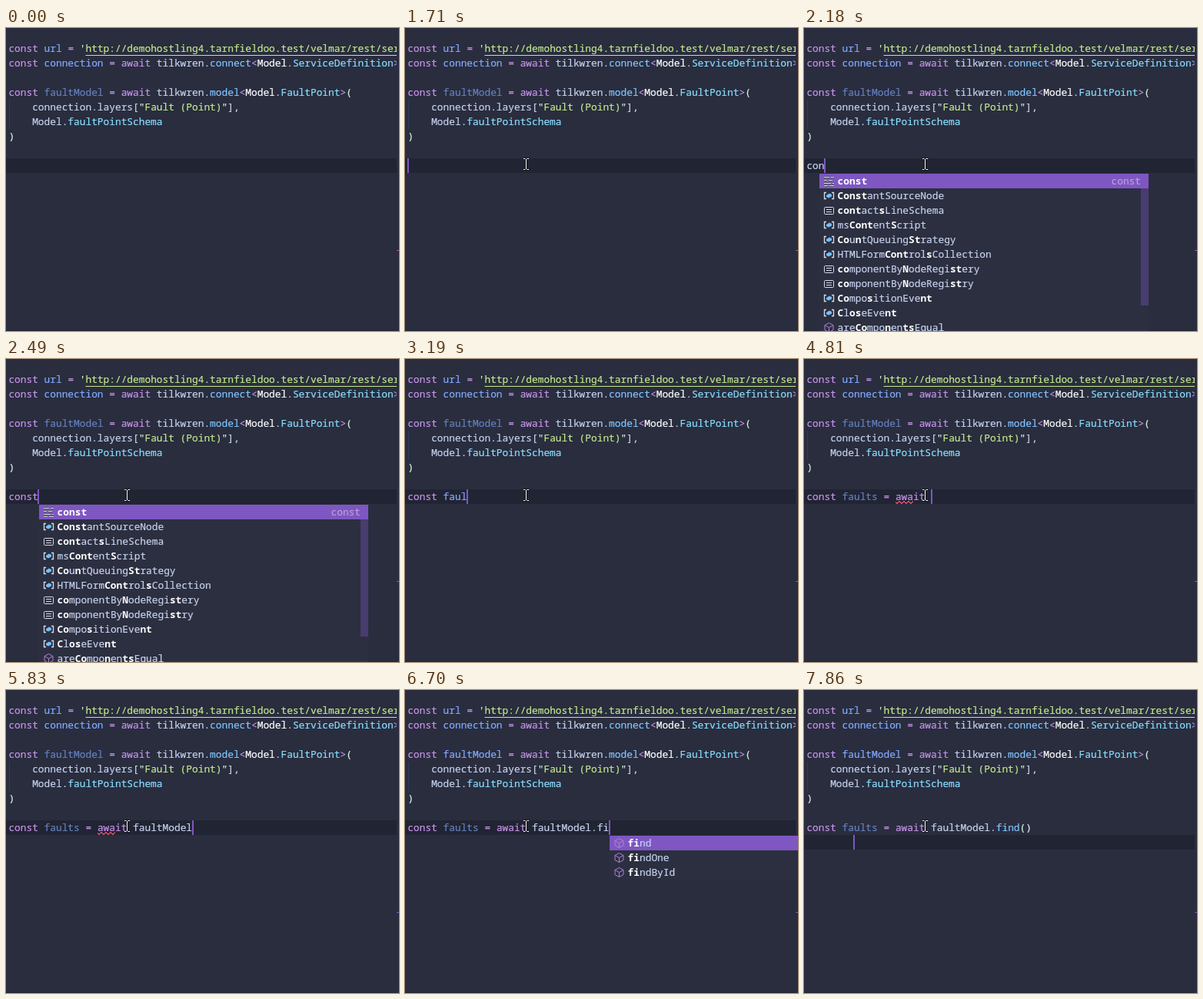
An HTML page for the animation above (8 s loop, 511 by 393 pixels).

```html
<!DOCTYPE html>
<html lang="en">
<head>
<meta charset="utf-8">
<title>Typing a query</title>
<style>
  html, body { margin: 0; width: 100%; height: 100%; overflow: hidden; background: #292d3e; }
  body {
    position: relative; color: #c6d2ee; white-space: pre;
    font: 12.83px/19px "Noto Sans Mono", "DejaVu Sans Mono", monospace;
    -webkit-text-stroke: .2px;
  }
  body > *, .row > * { position: absolute; }
  .line { left: 3.4px; width: 504.6px; height: 19px; overflow: hidden; }
  .k { color: #c792ea; }
  .v { color: #82aaff; }
  .f { color: #82c4ff; }
  .p { color: #89ddff; }
  .s { color: #c3e88d; }
  .q { color: #d9f5dd; }
  .w { color: #fff; }
  .dim { color: #6480be; }
  .link { text-decoration: underline 1px; text-underline-offset: 4px; }
  #active { left: 0; width: 508px; height: 19px; background: #212433; }
  #guide { left: 4px; top: 93px; width: 1px; height: 38px; background: #32395c; }
  #foot { left: 0; top: 392px; width: 508px; height: 1px; background: #212433; }
  #mark { left: 508px; top: 288px; width: 3px; height: 1px; }
  #caret { width: 2px; height: 19px; background: #7e57c2; }
  #wave { top: 184px; height: 4px; overflow: hidden; }
  #popup { top: 189px; width: 428px; overflow: hidden; background: #2c2f40; }
  #thumb { right: 0; top: 0; width: 10px; height: 171px; position: absolute; background: rgba(126, 87, 194, .353); }
  .row { position: relative; height: 19px; }
  .row.on { background: #7e57c2; }
  .row svg { left: 5px; top: 2px; }
  .row span { left: 23.6px; }
  .row b { color: #fff; -webkit-text-stroke: 0; }
  .row em { right: 10px; font-style: normal; color: #b7a0dc; }
  svg { fill: none; stroke: #d5d9e8; }
  #mouse { left: 0; top: 0; }
</style>
</head>
<body><div id="active"></div><div id="guide"></div><div id="foot"></div><div id="mark"></div><svg id="wave" width="40" height="4"><path stroke="#ff5370" stroke-width="1.1"/></svg><div id="popup"></div><div id="caret"></div><svg id="mouse" width="9" height="18"><path stroke="#111" stroke-width="3" opacity=".6" d="M1 1.5h7M1 15.5h7M4.5 1v15"/><path stroke="#fff" d="M1 1.5h2.5M5.5 1.5h2.5M1 15.5h2.5M5.5 15.5h2.5M4.5 2v13"/></svg>
<script>
const LOOP = 8000, CELL = 7.698, LEFT = 3.4, ROW = 19;
const $ = id => document.getElementById(id);
const tag = (cls, s) => `<span class="${cls}">${s}</span>`;
const colX = col => LEFT + col * CELL;

const host = '//demohostling4.tarnfieldoo.test/velmar/rest/service';
const decl = (name, cls) => `${tag('k', 'const')} ${tag(cls, name)} ${tag('k', '=')} `;
const call = (fn, type) => `${tag('k', 'await')} tilkwren.${tag('f', fn)}` +
  `${tag('k', '&lt;')}${tag('w', 'Model')}.${tag('p', type)}${tag('k', '&gt;')}${tag('q', '(')}`;
const fixed = [
  decl('url', 'v') + tag('q', "'") + tag('s link', 'http:' + host),
  decl('connection', 'v') + call('connect', 'ServiceDefinition') + 'url)',
  '',
  decl('faultModel', 'dim') + call('model', 'FaultPoint'),
  `    connection.layers[${tag('q', '"')}${tag('s', 'Fault (Point)')}${tag('q', '"')}],`,
  `    Model.${tag('p', 'faultPointSchema')}`,
  tag('q', ')')
];

function addLine(html, n) {
  const el = document.createElement('div');
  el.className = 'line';
  el.style.top = 17 + n * ROW + 'px';
  el.innerHTML = html;
  document.body.insertBefore(el, $('wave'));
  return el;
}
const lines = fixed.map(addLine);
const typed = addLine('', 8);
const modelName = lines[3].children[1];

// First letter picks the icon; stars wrap the matched letters.
const lists = {
  c: ['k*const*', 'i*Const*antSourceNode', 'c*cont*act*s*LineSchema', 'ims*Cont*ent*S*cript',
    'i*Co*u*n*tQueuing*St*rategy', 'iHTMLForm*Cont*rol*s*Collection', 'c*co*mponentBy*N*odeRegi*st*ery',
    'c*co*mponentBy*N*odeRegi*st*ry', 'i*Co*mpo*s*itionEve*nt*', 'i*C*l*os*eEve*nt*',
    'mare*Co*mpo*n*en*ts*Equal', 'i*Con*volverNode'],
  a: ['kawait', 'iAnimationWait', 'iAudioWorklet', 'iAudioWorkletNode', 'mareWaitingItems', 'iAbstractWorker',
    'callowAwait', 'iAriaWidget', 'cactiveWatcher', 'marrayWalk', 'cattachWarning', 'iAutoWrapAttr'],
  f: ['ifaultModel', 'cfaultPointSchema', 'cfaults', 'cdefaultStatus', 'kfunction', 'kfalse',
    'kfor', 'mfetch', 'iFile', 'iFileList', 'iFileReader', 'iFocusEvent'],
  m: ['mfind', 'mfindOne', 'mfindById', 'minfo']
};

const bars = 'd="M1 2.5h7M10 2.5h4M1 6.5h4M7 6.5h5M1 10.5h9M12 10.5h2M1 13.500h5M8 13.500h6"';
const icons = {
  k: `<path stroke="#2b2440" stroke-width="3" ${bars}/><path stroke-width="1.4" ${bars}/>`,
  i: '<path stroke-width="1.3" d="M4 3.5H1.5v8H4M11 3.5h2.5v8H11"/><path fill="#75beff" stroke="none" d="M4 7l4-2.5 3 1.5v2.500l-4 2-3-1.500z"/>',
  c: '<rect x="1.5" y="3.5" width="12" height="9" rx="1"/><path d="M4 6.5h7M4 9.5h7"/>',
  m: '<path stroke="#b180d7" d="M7.5 1.5l5.5 3v6l-5.5 3-5.5-3v-6zM2 4.5l5.5 3 5.5-3M7.5 7.5v6"/>'
};

// [time, text, list, rows, popup column]
const steps = [
  [0, ''],
  [1940, 'c'], [2020, 'c', 'c', 12, 1], [2100, 'co', 'c', 12, 1], [2180, 'con', 'c', 12, 2],
  [2260, 'con', 'c', 12, 3], [2330, 'cons', 'c', 12, 3], [2410, 'const', 'c', 12, 4], [2490, 'const', 'c', 12, 5],
  [2870, 'const '], [2950, 'const f'], [3030, 'const fa'], [3100, 'const fau'], [3180, 'const faul'],
  [3260, 'const fault'], [3340, 'const faults'], [3420, 'const faults '],
  [3650, 'const faults ='], [3730, 'const faults = '], [3880, 'const faults = a'],
  [3960, 'const faults = aw', 'a', 12, 17], [4110, 'const faults = awa', 'a', 10, 17],
  [4580, 'const faults = awai', 'a', 5, 19], [4660, 'const faults = await', 'a', 5, 20],
  [4810, 'const faults = await '],
  [4980, 'const faults = await f'], [5060, 'const faults = await fa', 'f', 12, 22],
  [5140, 'const faults = await fau', 'f', 4, 23], [5220, 'const faults = await faul', 'f', 4, 25],
  [5300, 'const faults = await fault', 'f', 4, 26], [5450, 'const faults = await faultM', 'f', 2, 26],
  [5530, 'const faults = await faultMo', 'f', 1, 26], [5600, 'const faults = await faultMod', 'f', 1, 26],
  [5680, 'const faults = await faultMode', 'f', 1, 26], [5830, 'const faults = await faultModel'],
  [6380, 'const faults = await faultModel.', 'm', 4, 32], [6530, 'const faults = await faultModel.f', 'm', 4, 32],
  [6620, 'const faults = await faultModel.fi', 'm', 4, 33], [6700, 'const faults = await faultModel.fi', 'm', 3, 34],
  [6780, 'const faults = await faultModel.fin', 'm', 2, 36], [6930, 'const faults = await faultModel.find', 'm', 2, 36],
  [7080, 'const faults = await faultModel.find'], [7310, 'const faults = await faultModel.find('],
  [7390, 'const faults = await faultModel.find()']
];

function paint(text, unused) {
  const style = m => /^(const|await|=)$/.test(m) ? 'k' : /[()]/.test(m) ? 'q' :
    m === 'find' ? 'f' : unused ? 'dim' : 'v';
  return text.replace(/\b(?:const|await)\b|[=()]|(?<=const )\w+|\w+(?=\()/g, m => tag(style(m), m));
}

function emphasize(label, word) {
  if (label.includes('*')) return label.replace(/\*(.+?)\*/g, '<b>$1</b>');
  let i = 0;
  return [...label].map(ch =>
    i < word.length && ch.toLowerCase() === word[i].toLowerCase() ? (i++, `<b>${ch}</b>`) : ch).join('');
}

function showPopup(text, list, rows, col) {
  const box = $('popup');
  box.style.display = list ? 'block' : 'none';
  if (!list) return;
  const word = text.match(/\w*$/)[0];
  box.style.left = Math.round(colX(col) + 1) + 'px';
  box.innerHTML = lists[list].slice(0, rows).map((item, n) => {
    const kind = item[0], label = item.slice(1);
    const detail = !n && kind === 'k' ? `<em>${label.replace(/\*/g, '')}</em>` : '';
    return `<div class="row${n ? '' : ' on'}"><svg width="15" height="15">${icons[kind]}</svg>` +
      `<span>${emphasize(label, word)}</span>${detail}</div>`;
  }).join('') + (rows > 11 ? '<div id="thumb"></div>' : '');
}

function placeWave(t) {
  const [col, len] = t >= 3500 && t < 4580 ? [0, 5] : t >= 4580 && t < 6290 ? [15, 3] : [0, 0];
  $('wave').style.left = Math.round(colX(col)) + 'px';
  $('wave').style.width = len * CELL + 'px';
}
$('wave').firstChild.setAttribute('d', 'M-1 .5' + 'l3 3 3-3'.repeat(7));

function placeMouse(t) {
  let x = 157, y = 176;
  if (t < 540) {
    const left = (1 - Math.floor((t - 70) / 78.3) / 6) ** 1.5;
    x += 139 * left;
    y += 161 * left;
  } else if (t >= 690 && t < 780) {
    x = 163;
    y = 172;
  }
  $('mouse').style.display = t < 70 ? 'none' : 'block';
  $('mouse').style.transform = `translate(${Math.round(x) - 4}px, ${Math.round(y) - 8}px)`;
}

function placeCaret(t, text) {
  const below = t >= 7630;
  const col = below ? (t < 7720 ? 0 : t < 7860 ? 4 : 8) : text.length - (t >= 7390 && t < 7480);
  const top = (below ? 188 : 169) + 'px';
  $('active').style.top = $('caret').style.top = top;
  $('caret').style.left = Math.floor(colX(col)) + 'px';
  $('caret').style.visibility = t < 780 || (t >= 1240 && t < 1710) ? 'hidden' : 'visible';
}

let shown;
const start = performance.now();
function draw() {
  const t = (performance.now() - start) % LOOP;
  const step = steps.findLast(s => s[0] <= t);
  if (step !== shown) {
    shown = step;
    typed.innerHTML = paint(step[1], step[0] >= 4580);
    showPopup(...step.slice(1));
  }
  modelName.className = t < 6290 ? 'dim' : 'v';
  $('mark').style.background = t < 1940 ? '#b45a78' : '#8a5bb5';
  placeWave(t);
  placeMouse(t);
  placeCaret(t, step[1]);
  requestAnimationFrame(draw);
}
draw();
</script>
</body>
</html>
```
